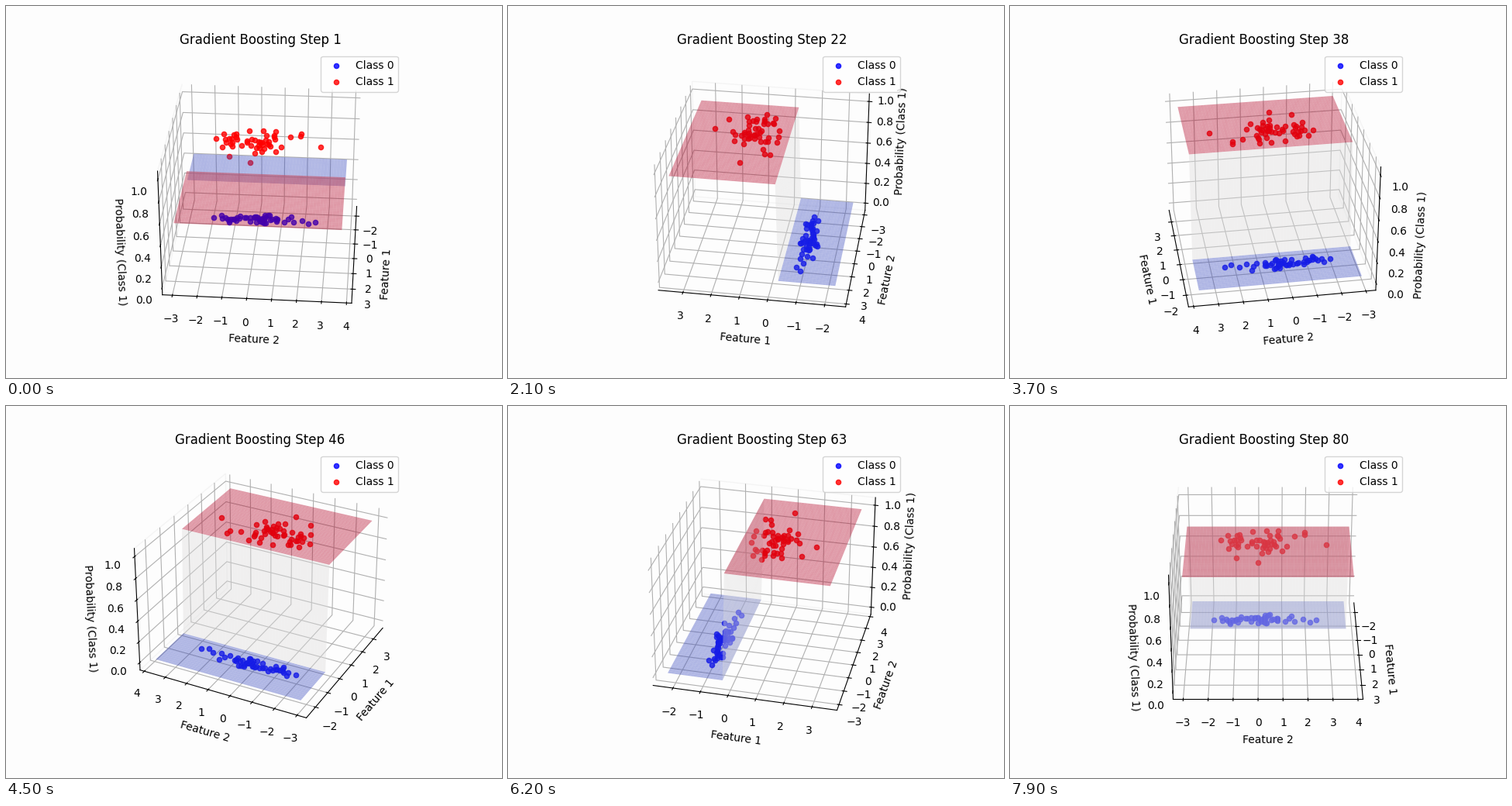
These frames come from a looping animation (640 px wide and 480 px high, 8000 ms). A matplotlib script:

```python
import numpy as np
import matplotlib.pyplot as plt
from matplotlib.animation import FuncAnimation

FRAMES = 80
INTERVAL = 100
LEARNING_RATE = 0.1
GRID_POINTS = 50
BACKGROUND = "#fdfdfd"


def make_samples(per_class=50):
    """Two classes separated along the first feature, noise along the second."""
    rng = np.random.RandomState(42)
    feature1 = rng.standard_normal(2 * per_class).reshape(2, per_class)
    for row, center in zip(feature1, (-1, 1)):
        row *= rng.uniform(-1, 1)
        row += center
    feature2 = rng.standard_normal(2 * per_class).reshape(2, per_class)
    return feature1, feature2


def class1_probability(steps):
    """Boosted probability on the class 1 side of the split."""
    log_odds = 0.0
    for _ in range(steps):
        log_odds += LEARNING_RATE * (1 + np.exp(-log_odds))
    return 1 / (1 + np.exp(-log_odds))


def padded_range(values):
    return np.linspace(values.min() - 1, values.max() + 1, GRID_POINTS)


feature1, feature2 = make_samples()
split = (feature1[0].max() + feature1[1].min()) / 2
grid_x, grid_y = np.meshgrid(padded_range(feature1), padded_range(feature2))


def surface_height(steps):
    p = class1_probability(steps)
    return np.where(grid_x > split, p, 1 - p)


def surface_quads(steps):
    grid = np.dstack([grid_x, grid_y, surface_height(steps)])
    corners = [grid[:-1, :-1], grid[:-1, 1:], grid[1:, 1:], grid[1:, :-1]]
    return np.stack(corners, axis=2).reshape(-1, 4, 3)


fig = plt.figure(figsize=(6.4, 4.8), dpi=100, facecolor=BACKGROUND)
ax = fig.add_subplot(111, projection="3d", facecolor=BACKGROUND)

for label, color in enumerate(("blue", "red")):
    ax.scatter(feature1[label], feature2[label], np.full(50, float(label)),
               c=color, alpha=0.8, depthshade=False, label=f"Class {label}")
surface = ax.plot_surface(grid_x, grid_y, surface_height(1),
                          cmap="coolwarm", alpha=0.4)

ax.set_xlabel("Feature 1")
ax.set_ylabel("Feature 2")
ax.set_zlabel("Probability (Class 1)")
ax.legend(loc="upper right")
title = ax.set_title("Gradient Boosting Step 1")

# Only the second feature's wall keeps a faint outline.
for axis, edge in ((ax.xaxis, "none"), (ax.yaxis, "0.925"), (ax.zaxis, "none")):
    axis.pane.set_fill(False)
    axis.pane.set_edgecolor(edge)


def update(frame):
    step = frame + 1
    surface.set_verts(surface_quads(step))
    title.set_text(f"Gradient Boosting Step {step}")
    ax.view_init(elev=30, azim=step * 360 / FRAMES)
    return surface, title


animation = FuncAnimation(fig, update, frames=FRAMES, interval=INTERVAL,
                          repeat=True, repeat_delay=0, blit=False)
plt.show()
```
